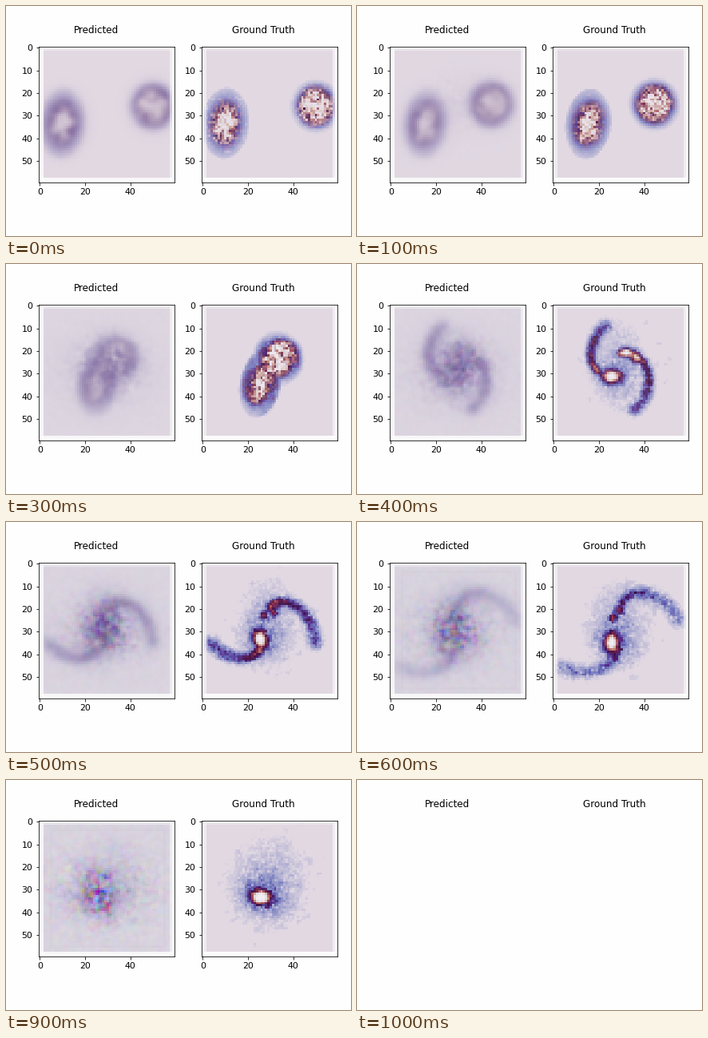
Animation, 432 px wide and 288 px high, one loop 1.16 s. Source, as a matplotlib script:

```python
import numpy as np
import matplotlib.pyplot as plt
from matplotlib.animation import FuncAnimation

N = 60                      # cells per side
W, H, DPI = 432, 288, 72
TICK, STEP, LOOP = 20, 100, 1160
POSES = 10                  # pictures shown before the blank pause
MERGE = 4                   # pose at which the discs have merged

plt.rcParams.update({"font.family": "DejaVu Sans",
                     "xtick.labelsize": 11, "ytick.labelsize": 11})
cmap = plt.get_cmap("twilight")
BASE = np.array(cmap(0.0)[:3])
HAZE = np.array([0.36, 0.27, 0.55])

# Two samples per cell, averaged down later
sub = (np.arange(2 * N) + 0.5) / 2 - 0.5
FX, FY = np.meshgrid(sub, sub)
CX, CY = np.meshgrid(np.arange(N), np.arange(N))


def polar(X, Y, x, y, rx, ry, tilt=0):
    c, s = np.cos(np.radians(tilt)), np.sin(np.radians(tilt))
    u = ((X - x) * c + (Y - y) * s) / rx
    v = ((Y - y) * c - (X - x) * s) / ry
    return np.hypot(u, v), np.arctan2(v, u)


def blob(X, Y, x, y, rx, ry, tilt=0):
    return np.exp(-polar(X, Y, x, y, rx, ry, tilt)[0] ** 2)


def arm(start, sweep, r_in, r_out, bend, width):
    """Tidal tail: a spiral from r_in to r_out that widens and fades."""
    s = np.linspace(0, 1, 70)
    a = np.radians(start + sweep * s)
    r = r_in + (r_out - r_in) * s ** bend
    d2 = ((FX[..., None] - 27 - r * np.cos(a)) ** 2
          + (FY[..., None] - 31 - r * np.sin(a)) ** 2)
    return ((1 - 0.5 * s) * np.exp(-d2 / (width * (1 + 0.6 * s)) ** 2)).max(-1)


def blur(a, sigma):
    n = 3 * int(np.ceil(sigma))
    k = np.exp(-np.arange(-n, n + 1) ** 2 / (2 * sigma ** 2))
    k /= k.sum()
    for axis in (0, 1):
        pad = [(n, n) if i == axis else (0, 0) for i in range(a.ndim)]
        p = np.pad(a, pad, mode="edge")
        size = a.shape[axis]
        a = sum(w * np.take(p, np.arange(i, i + size), axis)
                for i, w in enumerate(k))
    return a


def grain(rng, sigma):
    g = blur(rng.normal(size=(N, N)), sigma)
    return g / g.std()


def fine(a):
    return np.kron(a, np.ones((2, 2)))


def disc_pair(t):
    """Two spiral discs drifting towards each other."""
    r, a = polar(FX, FY, 10 + 5.25 * t, 33.5 + 0.2 * t, 9.5 - 0.4 * t, 14, 4 + 3 * t)
    left = 1.15 * np.exp(-(r / 0.7) ** 2) * (r < 1.1)
    left *= 1 + 0.14 * t * np.cos(2 * a - 7 * r) * np.clip(r, 0, 1)
    r, a = polar(FX, FY, 50 - 5.5 * t, 26 - 0.9 * t, 9.2, 9.7)
    right = 1.08 * np.exp(-(r / 0.9) ** 4)
    right *= 1 + 0.12 * t * np.cos(2 * a - 6 * r) * np.clip(r, 0, 1)
    return np.maximum(left, right)


def merger(u):
    """Bright core, a sinking pair of knots, two unwinding tails, a halo."""
    x, y = 25.5, 31.5 + 4 * np.sin(np.pi * u / 6)
    core = 1.15 * blob(FX, FY, x, y, 3.7, 2.7, 180 * (u / 5) ** 0.6)

    px, tilt = 26.5 + 7.5 * np.exp(-u), np.radians(35 - 42 * u)
    dx, dy = 2.4 * np.cos(tilt), 2.4 * np.sin(tilt)
    knots = sum(blob(FX, FY, px + k * dx, 22.5 + k * dy, 1.8, 1.8) for k in (-1, 1))
    knots = 0.6 * np.clip(2.5 - u / 2, 0, 1) * knots

    wide = 1.5 + 0.2 * u
    tails = (arm(75 + 119 * np.exp(-1.4 * u), 65, 8, 22 * (1 + 0.06 * u * u), 1, wide)
             + arm(-76, 48 + 87 * np.exp(-0.85 * u), 10 + 2 * u, 17 + 6 * u, 0.6, wide))
    tails = 0.72 * np.exp(-u * u / 5.5) * tails

    halo = (0.1 + 0.04 * u) * blob(FX, FY, x + 1, y, 8, 6, 25)
    debris = 0.1 * blob(FX, FY, 29, 27, 9 + u, 15)
    return core + knots + tails + halo + debris


def shade(d):
    """Thin matter only tints the background; dense matter follows the map."""
    thin = 0.27
    alpha = np.clip(d / thin, 0, 1)[..., None]
    rgb = BASE + alpha * (cmap(np.clip(d, thin, 1))[..., :3] - BASE)
    glow = 0.6 * np.clip(3 * (d - 1), 0, 1)[..., None]
    return rgb * (1 - glow) + glow


def truth(t):
    rng = np.random.default_rng(40 + t)
    noise = 0.75 * fine(grain(rng, 0.5)) + 0.65 * rng.normal(size=FX.shape)
    if t < MERGE:
        d = disc_pair(t) * (1 + 0.24 * noise)
    else:
        d = merger(t - MERGE)
        d *= 1 + (0.06 + 0.4 * np.clip(1 - 1.4 * d, 0, 1)) * noise
        dust = fine(np.clip(grain(rng, 1.0) - 0.5, 0, 2))
        d += 0.03 * dust * blob(FX, FY, 32, 28, 26, 26)
    rgb = shade(np.where(d < 0.025, 0, d))
    pale = max(0.42 - 0.08 * t, 0) * np.clip(1 + 0.5 * noise, 0, 2)[..., None]
    rgb += pale * (BASE - rgb)
    return rgb.reshape(N, 2, N, 2, 3).mean((1, 3))


def predicted(t, real):
    rng = np.random.default_rng(70 + t)
    soft = 0.75 * blur(real, 1.2) + 0.25 * blur(real, 4) - BASE
    ink = soft.mean(-1, keepdims=True) / (HAZE - BASE).mean()
    dull = np.array([0.035, 0.02, 0.015]) * min(t, 6) / 6
    keep = 0.4 + 0.6 * np.exp(-t / 2)
    rgb = BASE - dull + keep * (0.3 * soft + 0.7 * ink * (HAZE - BASE))

    # The forecast slides into a shrinking, speckled smudge
    u, doubt = t - MERGE, 1 - np.exp(-(t / 3) ** 2)
    body = 0.5 * blob(CX, CY, 30 - 0.8 * u, 27 + u, 10 - 0.9 * u, 9.5 - 0.4 * u)
    body += 0.12 * blob(CX, CY, 28, 30, 22, 15)
    e = (doubt * body * (1 + 0.28 * grain(rng, 0.8)))[..., None]
    rgb = rgb * (1 - e) + HAZE * e

    tint = np.stack([grain(rng, 0.7) for _ in range(3)], -1)
    spread = 0.02 * max(t - 3, 0) * np.clip(e, 0, 0.4) / 0.4
    rgb = rgb + (0.0007 * t + spread) * tint
    if t > 5:
        ring = np.maximum(abs(CX - 30), abs(CY - 29.5))
        rgb[(ring >= 25) & (ring < 26)] -= 0.012
    return rgb


def framed(rgb, xs, ys):
    """Fade to white outside the spans xs and ys, given in cells."""
    i = np.arange(N)
    mx, my = (np.clip(i + 1 - a, 0, 1) * np.clip(b - i, 0, 1) for a, b in (xs, ys))
    return np.clip(1 + (rgb - 1) * np.outer(my, mx)[..., None], 0, 1)


def pictures(t):
    real = truth(t)
    return (framed(predicted(t, real), (1.8, 58.5), (1.4, 58.2)),
            framed(real, (1.5, 58.5), (1.3, 58.1)))


def panel(left):
    ax = fig.add_axes([left / W, 67 / H, 170 / W, 170 / H])
    im = ax.imshow(np.ones((N, N, 3)), interpolation="nearest")
    ax.set_xticks(range(0, 60, 20))
    ax.set_yticks(range(0, 60, 10))
    ax.tick_params(pad=4)
    return ax, im


fig = plt.figure(figsize=(W / DPI, H / DPI), dpi=DPI, facecolor="#fefefe")
panels = [panel(41), panel(245)]
for x, title in ((113.5, "Predicted"), (322, "Ground Truth")):
    fig.text(x / W, 254 / H, title, size=12, ha="center", va="baseline")

shots = [pictures(t) for t in range(POSES)]


def update(i):
    t = i * TICK // STEP
    for k, (ax, im) in enumerate(panels):
        ax.set_visible(t < POSES)
        if t < POSES:
            im.set_data(shots[t][k])
    return [im for _, im in panels]


anim = FuncAnimation(fig, update, frames=LOOP // TICK, interval=TICK,
                     repeat=True, repeat_delay=0, blit=False)
plt.show()
```
